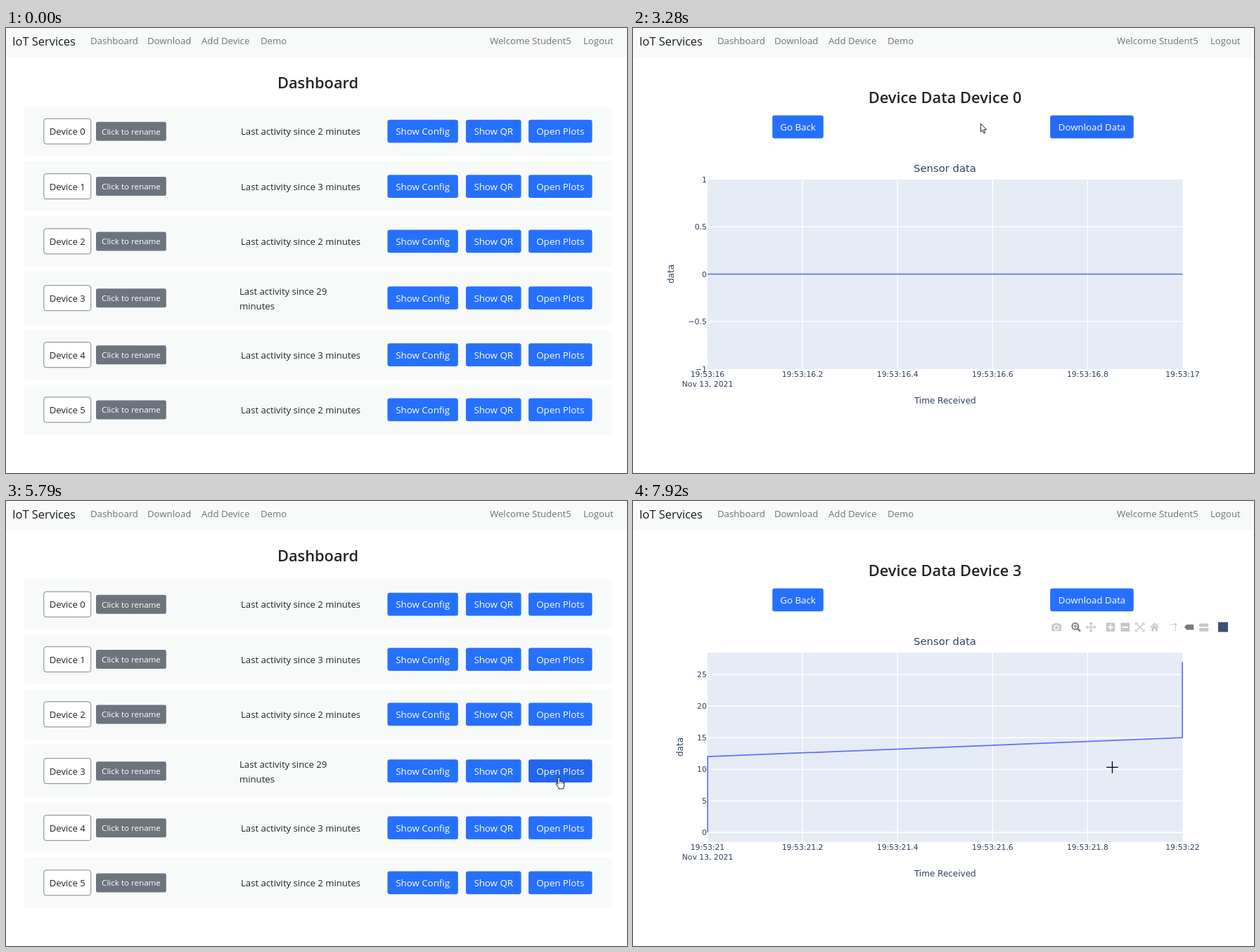
An HTML page that plays this animation: 883 by 634 pixels, repeating every 8000 ms.

```html
<!DOCTYPE html>
<html lang="en">
<head>
<meta charset="utf-8">
<title>IoT Services</title>
<style>
html, body { margin: 0; width: 100%; height: 100%; overflow: hidden; background: #fff; }
svg { display: block; width: 883px; height: 634px; }
text { font: 13.15px "Open Sans", "Noto Sans", sans-serif; fill: #212529; white-space: pre; }
.mid { text-anchor: middle; }
.end { text-anchor: end; }
.brand { font-size: 16.4px; fill: #191a1a; }
.nav { font-size: 13.2px; fill: #717272; }
.head { font-size: 21.8px; font-weight: 600; }
.btn { font-size: 13.3px; fill: #fff; text-anchor: middle; }
.small { font-size: 11.6px; fill: #fff; text-anchor: middle; }
.plot text { font-family: "DejaVu Sans", sans-serif; fill: #2a3f5f; }
.plot .head { font-family: "Open Sans", "Noto Sans", sans-serif; fill: #212529; }
.plot .btn { font-family: "Open Sans", "Noto Sans", sans-serif; fill: #fff; }
.plot .tick { font-size: 10.8px; }
.plot .axis { font-size: 12px; }
.plot .title { font-size: 14.8px; }
</style>
</head>
<body>
<svg id="stage" viewBox="0 0 883 634"></svg>
<script>
const LOOP = 8000;
const buttons = [];

const rect = (x, y, w, h, fill, extra = "") =>
  `<rect x="${x}" y="${y}" width="${w}" height="${h}" fill="${fill}" ${extra}/>`;
const text = (x, y, str, cls = "", extra = "") =>
  `<text x="${x}" y="${y}" class="${cls}" ${extra}>${str}</text>`;
const path = (d, stroke, width, extra = "") =>
  `<path d="${d}" fill="none" stroke="${stroke}" stroke-width="${width}" ${extra}/>`;

function button(page, id, x, y, w, label) {
  const h = 32.8;
  buttons.push({ page, id, x, y, w, h });
  return rect(x - 3, y - 3, w + 6, h + 6, "#93b9ff", `rx="6" id="${id}-ring" opacity="0"`) +
    rect(x, y, w, h, "#2670ff", `rx="3.3" id="${id}"`) +
    text(x + w / 2, y + 21.3, label, "btn");
}

function navbar() {
  const links = [[120, "Dashboard"], [201, "Download"], [278, "Add Device"], [362, "Demo"],
    [688, "Welcome Student5"], [821, "Logout"]];
  return rect(0, 0, 883, 41.5, "#f8fafa") + text(9, 25, "IoT Services", "brand") +
    links.map(([x, s]) => text(x, 23, s, "nav")).join("");
}

function dashboard() {
  // top, height, centre, minutes
  const rows = [[111.3, 71.7, 147.2, 2], [190, 71.4, 225.6, 3], [267.7, 72.3, 303.9, 2],
    [346.8, 76, 384.7, 29], [430.2, 71, 465.7, 3], [508, 72, 543.9, 2]];
  return text(443.5, 86, "Dashboard", "head mid") + rows.map(([top, h, c, min], i) => {
    const since = `Last activity since ${min}`;
    return rect(26, top, 835, h, "#f8fafa") +
      rect(53.8, c - 18, 66.9, 36, "#fff", 'rx="3.3" stroke="#7b838a" stroke-width="1"') +
      text(87.3, c + 5, `Device ${i}`, "mid") +
      rect(128, c - 13.5, 99.8, 27, "#6c757d", 'rx="2.5"') +
      text(178, c + 4.3, "Click to rename", "small") +
      (min > 9 ? text(332, c - 5, since) + text(332, c + 16, "minutes")
               : text(334, c + 5, since + " minutes")) +
      button("dash", `config${i}`, 542.4, c - 16.4, 100.4, "Show Config") +
      button("dash", `qr${i}`, 653.9, c - 16.4, 78.6, "Show QR") +
      button("dash", `open${i}`, 743, c - 16.4, 90.5, "Open Plots");
  }).join("");
}

function plotPage(device, second, ticks, yOf, trace, labelX) {
  const page = `plot${device}`;
  const xs = [0, 1, 2, 3, 4, 5].map(i => 106 + i * 135.1);
  const line = trace.map(([x, v]) => `${x} ${yOf(v)}`).join("L");
  let out = text(443.5, 107, `Device Data Device ${device}`, "head mid") +
    button(page, `back${device}`, 198.2, 124.5, 72.6, "Go Back") +
    button(page, `load${device}`, 593.2, 124.5, 118.6, "Download Data") +
    text(443.5, 205.4, "Sensor data", "title mid") +
    rect(106, 216, 675.5, 270, "#e5ecf6");
  xs.slice(1, 5).forEach(x => out += path(`M${x} 216V486`, "#fff", 1.4));
  ticks.forEach(v => {
    const y = yOf(v);
    if (y > 217 && y < 485) out += path(`M106 ${y}H781.5`, "#fff", v ? 1.4 : 2);
    out += text(104.8, y + 4, String(v).replace("-", "−"), "tick end");
  });
  out += path("M" + line, "#636efa", 1.7, 'stroke-linejoin="round"');
  xs.forEach((x, i) => {
    const s = i === 5 ? second + 1 : second + (i ? "." + i * 2 : "");
    out += text(x, 497, `19:53:${s}`, "tick mid");
  });
  return out + text(106, 510.6, "Nov 13, 2021", "tick mid") +
    text(443.8, 534.5, "Time Received", "axis mid") +
    text(0, 0, "data", "axis mid", `transform="translate(${labelX} 350.5) rotate(-90)"`);
}

function modebar() {
  const pale = "#c7c7c7", dark = "#7c7c7c";
  const sign = (x, d) => rect(x - 6.3, 173.6, 12.6, 12.4, pale, 'rx="1"') + path(d, "#fff", 2);
  return `<g id="bar">` +
    // camera
    path("M596.5 176.6H599L600.2 174.8H604.2L605.4 176.6H608V184.2H596.5Z", pale, 2, 'stroke-linejoin="round"') +
    rect(596, 176, 12.5, 8.6, pale) + `<circle cx="602.2" cy="180.4" r="3" fill="${pale}" stroke="#fff" stroke-width="1.4"/>` +
    // zoom
    `<circle cx="628.8" cy="178.4" r="4.4" fill="none" stroke="${dark}" stroke-width="2"/>` +
    path("M632 181.8L636 185.6", dark, 2.6) + path("M626.4 178.4H631.2M628.8 176V180.8", dark, 1.2) +
    // pan
    path("M646 179.8H656.5M651.2 174.5V185", pale, 1.4) +
    path("M649 175.5L651.2 173.2L653.4 175.5M649 184L651.2 186.3L653.4 184M647 177.6L644.8 179.8L647 182M655.4 177.6L657.6 179.8L655.4 182", pale, 1.4) +
    sign(679, "M675 179.8H683M679 175.8V183.8") +
    sign(699.8, "M695.8 179.8H703.8") +
    // autoscale
    path("M714.8 177V174H717.8M723.6 174H726.6V177M726.6 182.6V185.6H723.6M717.8 185.6H714.8V182.6", pale, 1.4) +
    path("M716.4 175.6L725 184M725 175.6L716.4 184", pale, 1.5) +
    // home
    path("M735.4 180.3L741.6 174.6L747.8 180.3M745.6 177V174.4", pale, 1.5) +
    `<path d="M737.4 180.6L741.6 176.8L745.8 180.6V185.6H742.9V182H740.3V185.6H737.4Z" fill="${pale}"/>` +
    // spikes
    path("M762.5 175.8H769", pale, 1.5, 'stroke-dasharray="2 1.6"') +
    path("M771.3 179V186", pale, 1.8, 'stroke-dasharray="2 1.6"') +
    `<circle cx="771.3" cy="175.8" r="1.9" fill="${pale}"/>` +
    // hover modes
    `<path d="M783.8 179.8L787.2 176H797.4V183.6H787.2Z" fill="${dark}"/>` +
    rect(805.2, 174.4, 13, 4.8, pale, 'rx="1"') + rect(805.2, 180.9, 13, 4.8, pale, 'rx="1"') +
    rect(832, 172.6, 14, 14, "#3f4f75") + `</g>`;
}

function cursors() {
  const skin = 'fill="#fff" stroke="#17203a" stroke-width="1" stroke-linejoin="round"';
  return `<g id="cursor">
    <path id="arrow" d="M.4 .6V12.4L3.1 9.8L5 14.4L6.8 13.6L4.9 9.2H8.7Z" ${skin}/>
    <g id="hand"><path d="M-1.3 10.4V1.6A1.3 1.3 0 0 1 1.3 1.6V6Q3.5 5 3.8 6.6Q5.6 5.8 6 7.3Q7.7 6.8 7.7 8.8V11.5Q7.7 13.5 6.6 15V16.5H-.2V15Q-2.2 13 -3.9 9.7Q-4.3 8.2 -3 8.1Q-2 8.4 -1.3 10.4Z" ${skin}/>
    <path d="M1.3 6V9M3.8 6.8V9.2M6 7.4V9.4" stroke="#17203a" stroke-width=".7"/></g>
    <path id="cross" d="M-8.4 0H8.4M0 -8.4V8.4" stroke="#000" stroke-width="1.3"/></g>`;
}

const flat = v => 350.7 - v * 135;
const steep = v => 472.2 - v * 9;
document.getElementById("stage").innerHTML = rect(0, 0, 883, 634, "#fff") + navbar() +
  `<g id="dash">${dashboard()}</g>
  <g id="plot0" class="plot">${plotPage(0, 16, [1, 0.5, 0, -0.5, -1], flat, [[106, 0], [781.5, 0]], 58)}</g>
  <g id="plot3" class="plot">${plotPage(3, 21, [0, 5, 10, 15, 20, 25], steep,
    [[106.2, 0], [106.2, 12], [781.2, 15], [781.2, 27]], 71)}${modebar()}</g>` + cursors();

const $ = id => document.getElementById(id);
const pageAt = t => t < 1880 ? "dash" : t < 4760 ? "plot0" : t < 7540 ? "dash" : "plot3";
const hit = (s, page) => buttons.find(b => b.page === page &&
  s.x >= b.x && s.x <= b.x + b.w && s.y >= b.y && s.y <= b.y + b.h);

// Pointer steps: each position holds until the next one.
const steps = [];
const put = (t, x, y, kind) => steps.push({ t, x, y, kind });
function glide(t0, t1, n, at) {
  for (let i = 0; i < n; i++) {
    const u = i / (n - 1);
    put(t0 + (t1 - t0) * u, ...at(u, i));
  }
}
const smooth = u => u * u * (3 - 2 * u);
const mix = (a, b, u) => a + (b - a) * u;

glide(250, 750, 5, u => [mix(739, 770.5, smooth(u)), mix(463, 132, smooth(u))]);
put(1270, 771, 120);
put(1380, 770.5, 131.2);
put(1880, 770.5, 131.2, "hand");
put(2400, 770.5, 132);
put(2520, 769, 132);
glide(3020, 3520, 5, u => [mix(735, 253, smooth(u)), mix(133, 138.3, u)]);
put(4760, 257, 140);
glide(4900, 5650, 7, (u, i) => {
  const k = (i + 1) / 7, curve = (a, b, c) => mix(mix(a, b, k), mix(b, c, k), k);
  return [curve(257, 760, 785), curve(140, 150, 361)];
});
glide(5790, 6400, 6, (u, i) => [mix(786, 793, u), [393.5, 404, 408, 405, 398, 393][i]]);
put(6540, 793, 390.2);
put(7540, 765, 388, "cross");
put(7680, 725, 383, "cross");
put(7820, 694, 380, "cross");
put(7920, 681.5, 379.3, "cross");

// Pressed button, start, end, and [time, strength] of its focus ring
const presses = [
  ["open0", 1380, 1880, [[1380, 1]]],
  ["back0", 4400, 4760, [[4400, 0.5], [4510, 1]]],
  ["open3", 6790, 7540, [[6790, 0.4], [6915, 0.8], [7040, 1]]]
];
const fades = [[7540, 0.25], [7680, 0.75], [7820, 0.93], [7920, 1]];
const held = (list, t) => list.filter(k => k[0] <= t).pop()?.[1] ?? 0;
const shade = (a, b, u) => `rgb(${a.map((v, i) => Math.round(mix(v, b[i], u)))})`;
const BASE = [38, 112, 255], HOVER = [34, 101, 239], DOWN = [31, 92, 208];

function draw(t) {
  const page = pageAt(t);
  for (const id of ["dash", "plot0", "plot3"]) $(id).style.display = id === page ? "" : "none";

  const n = steps.filter(s => s.t <= t).length - 1;
  const now = steps[n], last = steps[n - 1];
  const over = now && hit(now, page);
  const left = last && t - now.t < 150 && pageAt(last.t) === page && hit(last, page);
  const press = presses.find(p => t >= p[1] && t < p[2]);

  for (const b of buttons) {
    if (b.page !== page) continue;
    const down = press && press[0] === b.id;
    const glow = b === over ? 1 : b === left ? 0.5 : 0;
    $(b.id).setAttribute("fill", down ? shade(HOVER, DOWN, 1) : shade(BASE, HOVER, glow));
    $(b.id + "-ring").setAttribute("opacity", down ? held(press[3], t) : 0);
  }

  $("bar").setAttribute("opacity", held(fades, t));
  const kind = now && (now.kind || (over ? "hand" : "arrow"));
  for (const id of ["arrow", "hand", "cross"]) $(id).style.display = id === kind ? "" : "none";
  if (now) $("cursor").setAttribute("transform", `translate(${now.x} ${now.y})`);
}

const start = performance.now();
function tick() {
  draw((performance.now() - start) % LOOP);
  requestAnimationFrame(tick);
}
tick();
</script>
</body>
</html>
```
